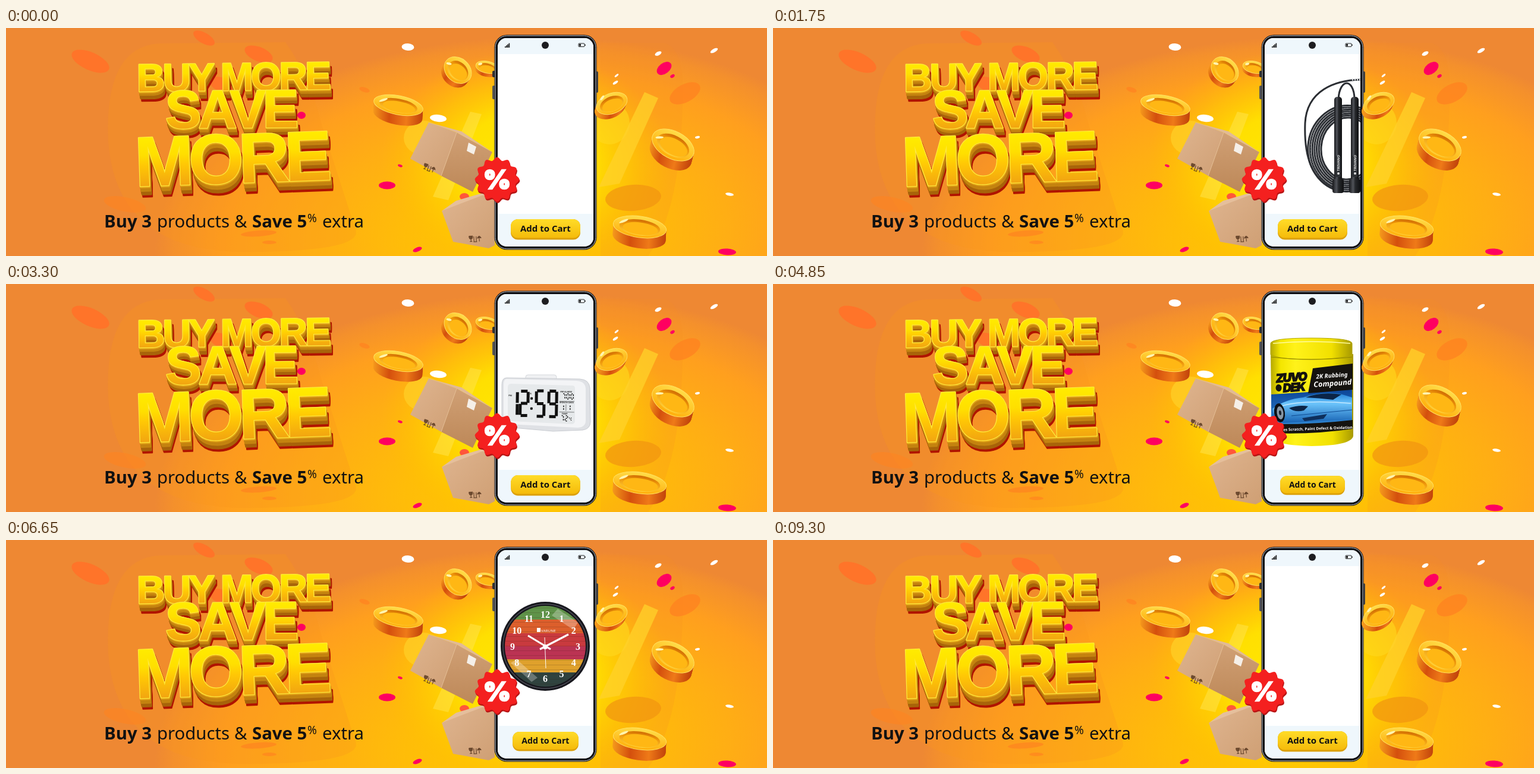
An HTML page for the animation above (9.5 s loop, 1280 px wide and 384 px high).

```html
<!DOCTYPE html>
<html lang="en">
<head>
<meta charset="utf-8">
<title>Buy more, save more</title>
<style>
html,body{margin:0;width:100%;height:100%;overflow:hidden;background:#ee8833}
svg{display:block;width:100vw;height:100vh}
text{font-family:"Noto Sans","Open Sans",sans-serif}
.block{font-family:"Liberation Sans",Arial,sans-serif;font-weight:700;stroke-linejoin:round}
.black{font-family:Inter,"Liberation Sans",sans-serif;font-weight:900}
.b{font-weight:700}
</style>
</head>
<body>
<svg id="stage" viewBox="0 0 1280 384" xmlns="http://www.w3.org/2000/svg"></svg>
<script>
const LOOP = 9500, STEP = 50, TRAVEL = 165;

const poly = (pts, fill, more = '') => `<polygon points="${pts}" fill="${fill}" ${more}/>`;
const path = (d, fill, more = '') => `<path d="${d}" fill="${fill}" ${more}/>`;
const line = (d, color, w, more = '') => path(d, 'none', `stroke="${color}" stroke-width="${w}" ${more}`);
const rect = (x, y, w, h, r, fill, more = '') =>
  `<rect x="${x}" y="${y}" width="${w}" height="${h}" rx="${r}" fill="${fill}" ${more}/>`;
const oval = (x, y, rx, ry, rot, fill, more = '') =>
  `<ellipse rx="${rx}" ry="${ry}" transform="translate(${x} ${y}) rotate(${rot})" fill="${fill}" ${more}/>`;
const text = (x, y, size, s, fill, more = '') =>
  `<text x="${x}" y="${y}" font-size="${size}" fill="${fill}" ${more}>${s}</text>`;
const group = (more, s) => `<g ${more}>${s}</g>`;
const grad = (id, stops, more = 'x2="0" y2="1"', kind = 'linear') =>
  `<${kind}Gradient id="${id}" ${more}>` + stops.map(([o, c, a = 1]) =>
    `<stop offset="${o}" stop-color="${c}" stop-opacity="${a}"/>`).join('') + `</${kind}Gradient>`;
const repeat = (n, f) => Array.from({length: n}, (_, i) => f(i)).join('');

const defs = '<defs>' +
  grad('back', [[0, '#ffc800'], [.3, '#ffbd08'], [.58, '#ffae14'], [.8, '#ff9f1e'], [.95, '#f4902c'], [1, '#ee8833']],
    'gradientUnits="userSpaceOnUse" cx="0" cy="0" r="1" gradientTransform="translate(860 350) rotate(-3) scale(610 335)"', 'radial') +
  grad('glow', [[0, '#ffe800'], [.45, '#ffe200', .95], [.72, '#ffd000', .55], [1, '#ffbc00', 0]],
    'gradientUnits="userSpaceOnUse" cx="0" cy="0" r="1" gradientTransform="translate(875 228) scale(245 190)"', 'radial') +
  grad('face', [[.1, '#fff000'], [.42, '#ffdf00'], [.55, '#ffc805'], [.85, '#f0a012']]) +
  grad('coin', [[0, '#ffdc48'], [1, '#ffae0a']]) +
  grad('well', [[0, '#d06c04'], [.35, '#ee960a'], [1, '#ffd038']]) +
  grad('edge', [[0, '#f59a1c'], [.35, '#d44f0d'], [.7, '#ef7a18'], [1, '#c2440b']], 'x2="1"') +
  grad('card', [[0, '#dfb590'], [1, '#cf9f74']], 'x2="1" y2="1"') +
  grad('cardDark', [[0, '#d0a075'], [1, '#bd8858']]) +
  grad('btn', [[0, '#ffdc28'], [1, '#f5bb0a']]) +
  grad('steel', [[0, '#77797c'], [.2, '#f4f4f4'], [.4, '#9b9da0'], [.6, '#eeeeee'], [.85, '#737578'], [1, '#c4c5c7']], 'x2="1"') +
  grad('dark', [[0, '#17181b'], [.35, '#505359'], [.55, '#26282b'], [1, '#0f1012']], 'x2="1"') +
  grad('base', [[0, '#23262a'], [.18, '#5b6168'], [.4, '#30343a'], [.75, '#3b4047'], [.9, '#6a7077'], [1, '#1c1e22']], 'x2="1"') +
  grad('jar', [[0, '#b5a800'], [.12, '#f4e600'], [.3, '#fff21a'], [.75, '#f1e000'], [1, '#a89a00']], 'x2="1"') +
  grad('bottle', [[0, '#a9adb2'], [.25, '#f1f2f3'], [.7, '#d4d7da'], [1, '#9a9ea4']], 'x2="1"') +
  grad('sky', [[0, '#0b4396'], [1, '#2f86d2']]) +
  grad('paint', [[0, '#1f7fd6'], [.35, '#6cc4fb'], [1, '#1763b4']]) +
  '<clipPath id="screen"><rect x="827" y="17" width="161" height="351" rx="15"/></clipPath>' +
  '<clipPath id="dial"><circle cx="907" cy="179" r="68"/></clipPath></defs>';

function backdrop() {
  const spots = [
    ['#ff7429', [142, 56, 34, 15, 24], [333, 17, 20, 9, 30], [425, 44, 25, 12, 22], [365, 96, 24, 12, 20]],
    ['#ff8420', [200, 297, 36, 12, 12, .6], [425, 346, 30, 5, -4, .7], [443, 361, 12, 3, 0, .7], [603, 104, 9, 4, 18, .8],
      [1142, 110, 28, 15, -28, .8]],
    ['#f39510', [1055, 286, 47, 22, -4, .7]],
    ['#ff0060', [1107, 68, 14, 9, -38], [1121, 81, 4, 2.5, -30], [641, 265, 14, 6.5, 0], [663, 232, 4, 2, 20],
      [692, 373, 8, 3.5, -22], [1213, 377, 15, 5.5, 3], [497, 147, 7, 6, 0], [771, 284, 8, 6, 0, .6]],
    ['#fff', [676, 32, 10.5, 6, 4], [727, 152, 14, 6, 6], [1191, 38, 7, 3, -30], [1097, 43, 6, 3, -28],
      [1025, 92, 5, 2, -35], [1027, 80, 4, 1.6, -40], [1163, 184, 4, 2, -10], [1217, 280, 7, 2.5, 10]]
  ];
  return rect(0, 0, 1280, 384, 0, '#ee8833') + rect(0, 0, 1280, 384, 0, 'url(#back)') +
    path('M172 190Q165 30 260 26L470 24Q510 80 530 160L588 340Q600 375 420 377Q185 384 172 190Z', '#f8961c', 'opacity=".3"') +
    path('M1000 25H1105Q1135 30 1138 90Q1140 300 1080 384H1000Z', '#f58c22', 'opacity=".18"') +
    rect(600, 0, 560, 384, 0, 'url(#glow)') +
    oval(702, 185, 33, 29, 0, '#ffd028', 'opacity=".7"') +
    oval(1015, 160, 34, 36, 0, '#ffd91e', 'opacity=".6"') +
    poly('781,141 800,145 744,290 718,284', '#ffe650', 'opacity=".5"') +
    poly('1074,108 1097,118 1032,262 997,268', '#ffd22a', 'opacity=".75"') +
    spots.map(([c, ...list]) => list.map(([x, y, a, b, r, o = 1]) =>
      oval(x, y, a, b, r, c, `opacity="${o}"`)).join('')).join('');
}

// Extruded block lettering
function block(x, y, size, gap, tilt, s, depth) {
  const at = (dx, dy, fill, edge = fill) =>
    text(x + dx, y + dy, size, s, fill, `class="block" letter-spacing="${gap}" stroke="${edge}" stroke-width="2.5"`);
  const n = depth + 1;
  return group(`transform="rotate(${tilt} ${x} ${y})"`,
    repeat(5, i => at(4, depth + 4 - i * 2, '#b01400')) +
    repeat(n, i => at((n - i) * .18, depth - i, i < n * .4 ? '#a8640a' : i < n * .75 ? '#c48310' : '#e0a016')) +
    at(0, 0, 'url(#face)', '#ffe93c') + at(0, 0, 'url(#face)', 'none'));
}

function headline() {
  const y = 336, word = (x, s, cls = '') => text(x, y, 29.3, s, '#111', `class="${cls}"`);
  return block(220, 107, 66, -3.9, -.7, 'BUY MORE', 12) +
    block(268, 169, 91, -5.5, -.4, 'SAVE', 11) +
    block(218, 267, 119, -8.5, -2, 'MORE', 14) +
    word(165, 'Buy 3', 'b') + word(254, 'products') + word(384, '&amp;') + word(414, 'Save 5', 'b') +
    text(507, 327, 19, '%', '#111', 'font-weight="500"') + word(532, 'extra');
}

function coin(x, y, rx, ry, rot, dx, dy) {
  return repeat(14, i => oval(x + dx * (1 - i / 14), y + dy * (1 - i / 14), rx, ry, rot, 'url(#edge)')) +
    oval(x, y, rx, ry, rot, 'url(#coin)', 'stroke="#ffe060" stroke-width="1"') +
    oval(x, y + 1, rx * .77, ry * .74, rot, 'url(#well)') +
    oval(x + 1, y + 3, rx * .66, ry * .58, rot, '#ffb714') +
    oval(x - rx * .6, y - ry * .55, rx * .18, 2, rot - 30, '#fff4b0');
}

const marks = (x, y, rot) => group(`transform="translate(${x} ${y}) rotate(${rot})" opacity=".85"`,
  path('M-10-5h6q0 5-3 5t-3-5M-7 0v4M-9 4h4M-2 5V-4M2 5V-4M-3 5H3M7 5V-4M4-1q3-6 6 0z', '#5b3a22', 'stroke="#5b3a22" stroke-width="1.2"'));

const boxes = () =>
  poly('733,308 798,281 822,277 822,366 812,371 752,360', 'url(#card)') +
  poly('733,308 757,291 815,274 822,277 798,283', '#e5bf9c') + marks(789, 355, -4) +
  poly('711,159 758,176 732,249 680,220', 'url(#card)') +
  poly('758,176 818,209 785,276 732,249', 'url(#cardDark)') +
  poly('711,159 766,174 818,209 758,176', '#e2ba96') +
  line('M758 176L732 249', '#e3bd9a', 1) +
  poly('778,193 791,200 787,213 775,207', '#f5efe8') + marks(712, 236, 20);

function bottle() {
  return rect(885, 44, 44, 34, 7, 'url(#dark)') +
    path('M885 78H929Q956 90 956 122V298Q956 312 942 312H872Q858 312 858 298V122Q858 90 885 78Z', 'url(#bottle)') +
    rect(858, 290, 98, 5, 0, '#b5b9be');
}

function rope() {
  const handle = x => rect(x, 116, 13, 150, 5, 'url(#dark)') + rect(x - 3, 254, 19, 24, 4, 'url(#dark)') +
    rect(x + 2, 215, 9, 36, 2, '#2d3034') +
    group(`transform="translate(${x + 9} 247) rotate(-90)"`, oval(2, -2, 2, 2, 0, '#ddd') + text(6, 0, 6, 'TRIVANO', '#eee', 'class="b"'));
  return group('transform="translate(-59.4 0)"',
    repeat(7, i => oval(966, 203, 44 + i * 3.7, 52 + i * 3.4, 4, 'none', 'stroke="#2b2e33" stroke-width="3"')) +
    repeat(3, i => oval(966, 203, 46 + i * 8, 54 + i * 7, 4, 'none', 'stroke="#85898f" stroke-width=".6" stroke-dasharray="3 2"')) +
    line('M945 272C905 255 893 215 895 160C898 105 945 88 988 87C1022 88 1030 130 1028 170C1026 230 1010 260 978 272', '#2b2e33', 3) +
    line('M974 87L988 87', '#d5d7da', 3, 'stroke-dasharray="2 2"') +
    line('M951 120C952 101 959 93 965 93S978 102 978 120', '#2b2e33', 3) +
    handle(944) + handle(972));
}

// Seven-segment digits
const LIT = {0: 'abcdef', 1: 'bc', 2: 'abged', 4: 'fgbc', 5: 'afgcd', 7: 'abc', 9: 'abcdfg'};
function digit(n, x, y, w, h, s) {
  const m = h / 2, segs = {a: `M1 0H${w - 1}`, b: `M${w} 1V${m - 1}`, c: `M${w} ${m + 1}V${h - 1}`,
    d: `M1 ${h}H${w - 1}`, e: `M0 ${m + 1}V${h - 1}`, f: `M0 1V${m - 1}`, g: `M1 ${m}H${w - 1}`};
  return group(`transform="translate(${x} ${y})"`, line([...LIT[n]].map(k => segs[k]).join(''), '#111', s));
}

function alarm() {
  const small = (s, y, x = 936) => [...s].map((n, i) => digit(n, x + i * 7, y, 4, 9, 1.5)).join('');
  const tag = (x, y, s) => text(x, y, 3.6, s, '#222', 'class="b"');
  return rect(874, 153, 52, 9, 4, '#f0f1f3', 'stroke="#d5d8dc"') +
    path('M842 158L965 160Q981 161 982 175L983 232Q983 244 970 246L920 248L842 241Q834 240 834 230V170Q834 158 842 158Z', '#dfe1e5', 'stroke="#c9ccd1"') +
    path('M842 160L960 163Q974 164 975 176V230Q975 241 962 242L846 236Q837 236 837 226V170Q837 160 842 160Z', '#f3f4f6') +
    path('M849 168L952 171Q957 171 957 176V230Q957 236 951 236L850 231Q844 231 844 225V174Q844 168 849 168Z', '#e6e9eb') +
    group('transform="rotate(1 900 200)"',
      digit(1, 848, 182, 12, 40, 5) + digit(2, 865, 181, 13, 41, 5) + rect(882, 191, 4, 4, 1, '#111') +
      rect(882, 208, 4, 4, 1, '#111') + digit(5, 892, 180, 13, 43, 5) + digit(9, 913, 180, 13, 43, 5) +
      tag(845, 190, 'PM') + tag(881, 186, 'A') + tag(932, 182, 'AM ALARM') + tag(931, 200, 'MONTH DATE') + tag(935, 219, 'TEMP') +
      small('700', 184) + small('1', 203, 934) + small('1', 203, 945) + small('72', 221, 934) + digit(4, 948, 223, 3, 7, 1.2) +
      line('M931 197H956M931 215H956M942 202V213', '#333', .6));
}

function polish() {
  const it = 'class="b" font-style="italic"';
  const name = 'class="black" font-style="italic" letter-spacing="-1.8" stroke="#15130f"';
  return path('M837 118H976V256Q973 272 906 273Q842 272 839 256Z', 'url(#jar)') +
    path('M837 100Q838 91 906 91Q973 91 974 100V119Q960 126 906 127Q850 127 837 119Z', 'url(#jar)', 'stroke="#b3a600" stroke-width="1"') +
    line('M841 100Q906 94 971 100', '#fffbA0', 1.5) + line('M838 123Q906 131 974 123', '#8f8400', 1.2) +
    path('M838 186Q906 182 974 176V233Q906 240 838 238Z', 'url(#sky)') +
    path('M840 210Q862 194 892 191Q922 180 954 185L974 191V228L858 234Q841 226 840 210Z', 'url(#paint)') +
    path('M896 191Q922 181 956 186L942 195Q918 192 896 191Z', '#0b2446') +
    path('M868 209Q885 203 900 206L893 213Q878 217 868 209Z', '#0b2446') +
    path('M890 226L932 219L926 227L894 231Z', '#0e2f5c') +
    line('M850 207Q890 194 972 201', '#c4e8ff', 1.6) + line('M872 222L974 212', '#0f4c93', 1) +
    oval(852, 217, 9, 16, -8, '#0b0f15') + oval(853, 217, 5.5, 11, -8, '#8796a5') + oval(853, 217, 2, 4, -8, '#18202a') +
    poly('908,142 975,134 975,178 900,184', '#15130f') +
    group('transform="rotate(-4 906 165)"',
      text(846, 162, 20, 'ZUVO', '#15130f', name) + text(857, 179, 20, 'DEK', '#15130f', name) +
      oval(850, 171, 5, 6, 0, '#15130f') + text(901, 179, 4, 'TM', '#15130f') +
      text(914, 160, 10, '2K Rubbing', '#fff', it) + text(909, 174, 12.6, 'Compound', '#fff', it)) +
    path('M838 236Q906 237 975 229V244Q906 254 838 251Z', '#15130f') +
    group('transform="rotate(-2 906 243)"', text(836, 246, 6.5, 'Removes Scratch, Paint Defect &amp; Oxidation', '#fff', 'class="b"'));
}

function wallClock() {
  const bands = [[111, 24, '#5f9349'], [134, 24, '#dc5f2c'], [157, 23, '#c93a3e'], [179, 23, '#bb3353'], [201, 23, '#dfa12c'], [223, 25, '#30433f']];
  return oval(907, 179, 75, 75, 0, '#17171d') + oval(907, 179, 71, 71, 0, 'none', 'stroke="#4c4c56" stroke-width="1.5"') +
    group('clip-path="url(#dial)"', bands.map(([y, h, c]) => rect(839, y, 136, h, 0, c)).join('') +
      repeat(17, i => rect(839, 114 + i * 8, 136, 1, 0, '#32180f', 'opacity=".18"')) +
      poly('928,116 962,139 954,151 918,127', '#fff', 'opacity=".28"') +
      poly('849,207 859,201 894,232 884,239', '#fff', 'opacity=".28"')) +
    repeat(12, i => {
      const a = (i + 1) * Math.PI / 6;
      return text(907 + 55 * Math.sin(a), 184.5 - 54 * Math.cos(a), 16, i + 1, '#fff',
        'text-anchor="middle" style="font-family:\'Liberation Serif\',serif;font-weight:700"');
    }) +
    rect(893, 148, 6, 7, 0, '#fff') + text(900, 155, 6, 'VARUNE', '#fff', 'letter-spacing=".3"') +
    line('M916 184L878 161M898 184L946 159', '#fff', 3.2) + line('M906 164L908 216', '#fff', 1) + oval(907, 180, 4, 4, 0, '#fff');
}

function mixer() {
  const pot = (x, y, w, h) => rect(x, y + 5, w, h - 5, 6, 'url(#steel)') + rect(x - 2, y, w + 4, 9, 4, 'url(#dark)') +
    rect(x + 1, y + h - 9, w - 2, 9, 4, 'url(#dark)');
  return group('transform="translate(-34.1 0)"',
    pot(966, 180, 46, 36) + pot(953, 217, 58, 47) +
    line('M940 116H949Q955 117 954 127L951 154', '#1b1c1f', 8, 'stroke-linecap="round"') +
    path('M891 110H941L935 166H898Z', 'url(#steel)') + path('M896 162H937V171H896Z', '#1a1b1e') +
    path('M890 113Q890 97 900 94L907 92V88Q907 86 911 86H921Q925 86 925 88V92L932 94Q942 97 942 113Z', 'url(#dark)') +
    rect(908, 88, 16, 3, 1, '#aaa') + line('M891 113H941', '#c9cbce', 1) +
    path('M896 170H937L939 199Q950 220 950 248Q950 262 940 264H892Q881 262 881 248Q882 220 894 199Z', 'url(#base)') +
    line('M894 199Q916 204 939 199', '#858a90', 1) + line('M882 247Q915 262 949 247', '#9ea3a9', 1.4) +
    text(916, 213, 8, 'Dalviro', '#eee', 'text-anchor="middle" class="b" font-style="italic"') +
    oval(915, 238, 8, 8, 0, '#9b9ea2') + oval(915, 238, 5.5, 5.5, 0, '#dadbdd') + rect(914, 231, 2, 8, 0, '#666') +
    rect(887, 262, 9, 6, 2, '#111') + rect(935, 262, 9, 6, 2, '#111'));
}

// draw, enter start and length, press start, leave start and length
const items = [
  [bottle, 50, 350, 700, 750, 400],
  [rope, 1550, 500, 2150, 2550, 350],
  [alarm, 2800, 350, 3300, 3700, 400],
  [polish, 4000, 500, 4700, 5100, 450],
  [wallClock, 5850, 450, 6450, 6900, 450],
  [mixer, 7750, 550, 8300, 8800, 500]
];

function phone() {
  return rect(818, 72, 5, 11, 2, '#333') + rect(818, 97, 5, 23, 2, '#555') + rect(992, 73, 4, 36, 2, '#444') +
    rect(821.5, 11.5, 172, 362, 21, '#0d0e12') + rect(823, 13, 169, 359, 19.5, 'none', 'stroke="#c8ccd2" stroke-width="1"') +
    rect(827, 17, 161, 351, 15, '#fff') +
    group('clip-path="url(#screen)"', rect(827, 16, 161, 28, 0, '#eff7fc') + rect(827, 313, 161, 57, 0, '#eff7fc') +
      items.map(([draw], i) => group(`id="item${i}"`, draw())).join('')) +
    oval(907, 29, 6, 6, 0, '#1d1d20') +
    repeat(4, i => rect(839 + i * 2.2, 31 - i * 1.8, 1.6, 2 + i * 1.8, 0, '#111')) +
    rect(963, 26, 10, 5.5, 1, 'none', 'stroke="#222"') + rect(964, 27, 3, 3.5, 0, '#222') + rect(973.5, 27.5, 1.2, 2.5, 0, '#222') +
    group('id="button"', rect(849, 322, 117, 34.5, 12, '#dca008') + rect(849, 322, 117, 31.5, 12, 'url(#btn)') +
      text(865, 343, 15, 'Add to Cart', '#111', 'class="b"'));
}

function badge() {
  const rim = Array.from({length: 144}, (_, i) => {
    const a = i * Math.PI / 72, r = 34.8 + 2.6 * Math.cos(12 * a);
    return (826 + r * Math.sin(a)).toFixed(1) + ',' + (255 - r * Math.cos(a)).toFixed(1);
  }).join(' ');
  return poly(rim, '#b81414', 'transform="translate(1 2.5)"') + poly(rim, '#f4201f') +
    text(826, 271, 44, '%', '#fff', 'class="black" text-anchor="middle" stroke="#fff" stroke-width="2.6"');
}

const stage = document.getElementById('stage');
stage.innerHTML = defs + backdrop() + headline() +
  coin(660, 130, 42, 16, 11, -1, 17) + coin(760, 71, 25, 20, 42, -5, 7) + coin(809, 66, 19, 10, 12, -1, 6) + boxes() +
  phone() + badge() +
  coin(1019, 127, 27, 17, -22, -3, 8) + coin(1122, 197, 38, 23, 28, -4, 16) + coin(1066, 335, 45, 18, 8, -1, 18);

const nodes = items.map((_, i) => document.getElementById('item' + i));
const button = document.getElementById('button');
const part = (t, start, length) => Math.min(1, Math.max(0, (t - start) / length));

function render(ms) {
  const t = Math.floor(ms % LOOP / STEP) * STEP;
  let press = 0;
  items.forEach(([, inAt, inFor, pressAt, outAt, outFor], i) => {
    const x = TRAVEL * ((1 - part(t, inAt, inFor)) ** 2 - part(t, outAt, outFor) ** 2);
    const shown = t >= inAt && t < outAt + outFor;
    nodes[i].setAttribute('visibility', shown ? 'visible' : 'hidden');
    nodes[i].setAttribute('transform', `translate(${x.toFixed(2)} 0)`);
    press += Math.sin(Math.PI * part(t, pressAt - 30, 350)) ** 2;
  });
  button.setAttribute('transform', `translate(907.5 339) scale(${1 - .07 * press}) translate(-907.5 -339)`);
}

const begin = performance.now();
function tick() {
  render(performance.now() - begin);
  requestAnimationFrame(tick);
}
tick();
</script>
</body>
</html>
```
